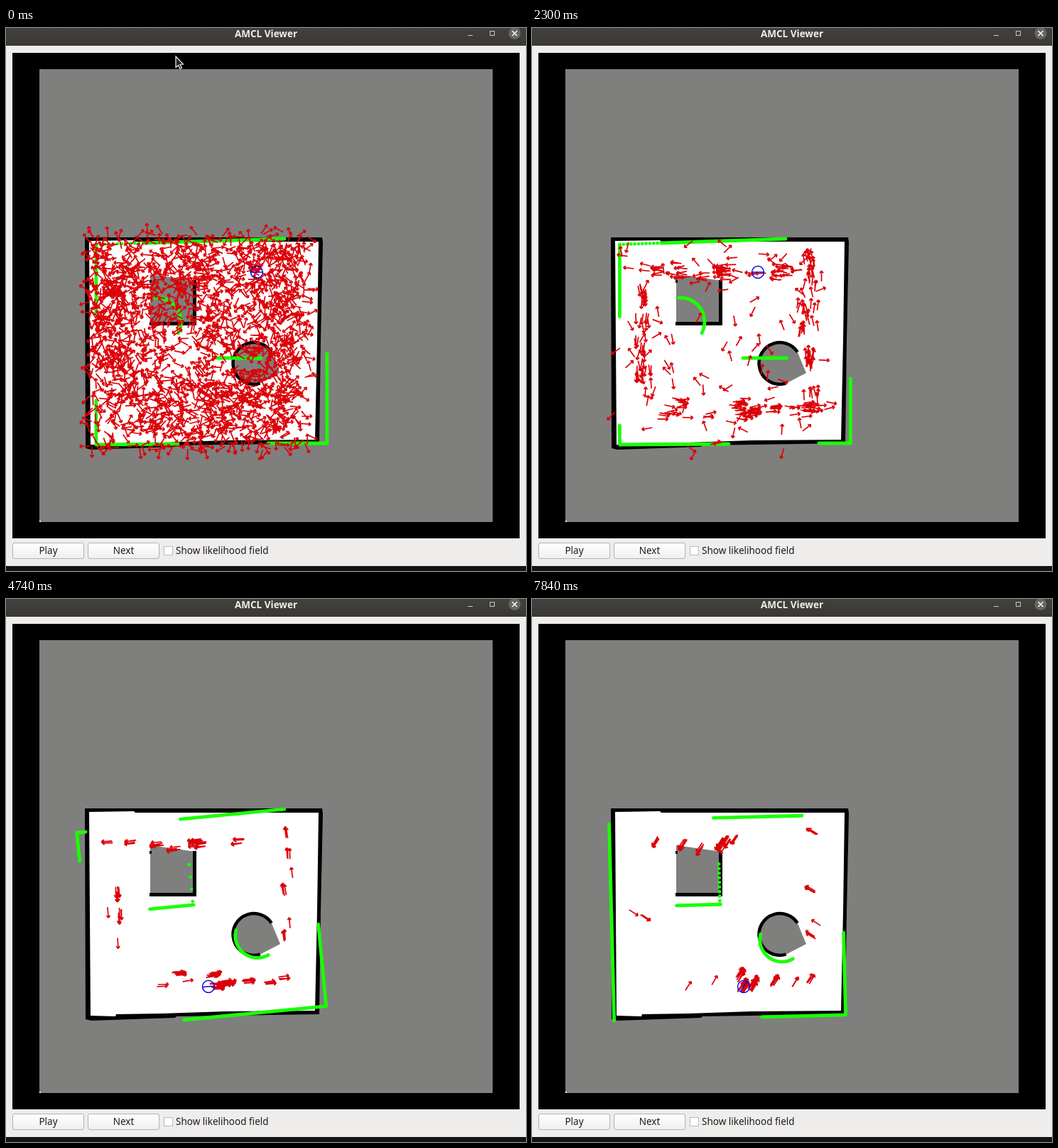
An HTML page with a canvas for the animation above (8 s loop, 732x765 px).

```html
<!DOCTYPE html>
<html lang="en">
<head>
<meta charset="utf-8">
<title>AMCL Viewer</title>
<style>
html, body { margin: 0; width: 100%; height: 100%; overflow: hidden; background: #efedec; }
canvas { display: block; }
</style>
</head>
<body>
<canvas id="view" width="732" height="765"></canvas>
<script>
const ctx = document.getElementById('view').getContext('2d');
const LOOP = 8000;
const RAD = Math.PI / 180;
const RED = '#dc0008', GREEN = '#1aff05', GRAY = '#7f7f7e';

// Times of the filter updates, and when the estimate jumps to the other side
const updates = [0, 40, 640, 1180, 1660, 2300, 2700, 3220, 3700,
                 4240, 4740, 5260, 5760, 6280, 6820, 7380, 7840];
const JUMP = 4240;

// Route around the room: x1, y1, x2, y2, heading
const lanes = [
  [370, 343, 130, 344, 180],
  [156, 365, 157, 512, 90],
  [178, 541, 422, 539, 0],
  [393, 530, 390, 310, 270]
];

// Hypotheses that survive longest: x, y, count, lane
const survivors = [
  [269, 345, 22, 0], [212, 346, 6, 0], [174, 343, 4, 0], [236, 352, 4, 0],
  [159, 449, 2, 1], [143, 442, 1, 1],
  [293, 528, 10, 2], [299, 546, 14, 2], [313, 542, 13, 2], [341, 538, 7, 2],
  [371, 541, 2, 2], [393, 534, 3, 2], [220, 545, 1, 2], [257, 537, 1, 2],
  [393, 328, 3, 3], [391, 409, 4, 3], [391, 473, 3, 3], [400, 456, 1, 3]
];

function rng(seed) {
  return () => {
    seed = seed + 0x6D2B79F5 | 0;
    let v = Math.imul(seed ^ seed >>> 15, 1 | seed);
    v = v + Math.imul(v ^ v >>> 7, 61 | v) ^ v;
    return ((v ^ v >>> 14) >>> 0) / 4294967296;
  };
}

// Estimated pose; the robot drives straight, then turns left
function poseAt(t) {
  if (t < JUMP) return { x: 353 - 0.0152 * t, y: 344, turn: 0 };
  const u = t - 4740;
  return {
    x: 285 + 18 * Math.sin(u / 1330),
    y: 546,
    turn: -5 - 25 * (Math.max(0, u) / 2080) ** 1.83
  };
}

function rect(x, y, w, h, fill) {
  ctx.fillStyle = fill;
  ctx.fillRect(x, y, w, h);
}

function path(pts) {
  ctx.beginPath();
  for (let i = 0; i < pts.length; i += 2) ctx.lineTo(pts[i], pts[i + 1]);
}

function poly(pts, fill) {
  path(pts);
  ctx.closePath();
  ctx.fillStyle = fill;
  ctx.fill();
}

function line(...pts) {
  path(pts);
  ctx.stroke();
}

function arc(x, y, r, from, to, back) {
  ctx.beginPath();
  ctx.arc(x, y, r, from * RAD, to * RAD, back);
}

function dots(x1, y1, x2, y2, n) {
  for (let i = 0; i < n; i++) {
    const k = i / (n - 1);
    arc(x1 + (x2 - x1) * k, y1 + (y2 - y1) * k, 2.4, 0, 360);
    ctx.fill();
  }
}

function label(text, x, y, align, fill = '#1c1c1c', weight = '') {
  ctx.font = weight + ' 13.5px "Noto Sans", "Open Sans", sans-serif';
  ctx.textAlign = align;
  ctx.fillStyle = fill;
  ctx.fillText(text, x, y);
}

function shade(y1, y2, top, bottom) {
  const g = ctx.createLinearGradient(0, y1, 0, y2);
  g.addColorStop(0, top);
  g.addColorStop(1, bottom);
  return g;
}

function button(x, text) {
  ctx.beginPath();
  ctx.roundRect(x + 0.5, 725.5, 100, 22, 2.5);
  ctx.fillStyle = shade(725, 748, '#ffffff', '#f0efee');
  ctx.fill();
  ctx.strokeStyle = '#b4b2b0';
  ctx.lineWidth = 1;
  ctx.stroke();
  label(text, x + 50.5, 741, 'center');
}

function drawWindow() {
  rect(0, 0, 732, 765, '#efedec');
  rect(0, 0, 732, 25, shade(0, 25, '#43413d', '#3a3834'));
  label('AMCL Viewer', 366, 13, 'center', '#f0eee9', 'bold');
  ctx.lineWidth = 1;
  ctx.strokeStyle = '#c9c7c2';
  line(650, 10.5, 657, 10.5);
  ctx.strokeRect(681.5, 4.5, 6, 6);
  arc(716, 7.5, 8.5, 0, 360);
  ctx.fillStyle = '#686661';
  ctx.fill();
  ctx.strokeStyle = '#ffffff';
  ctx.lineWidth = 1.5;
  line(712.5, 4, 719.5, 11);
  line(719.5, 4, 712.5, 11);

  rect(9, 35, 714, 684, '#000');
  rect(47, 58, 638, 638, GRAY);
  rect(47, 694, 2, 2, '#eee');

  button(9, 'Play');
  button(115, 'Next');
  rect(222.5, 730.5, 12, 12, '#fff');
  ctx.strokeStyle = '#bcbab8';
  ctx.lineWidth = 1;
  ctx.strokeRect(222.5, 730.5, 12, 12);
  label('Show likelihood field', 239, 741, 'left');
  rect(0, 758, 732, 7, '#141414');
}

function drawMap() {
  poly([111, 295, 445, 295, 446, 302, 443, 440, 441, 585, 240, 588, 238, 590, 120, 594, 112, 592], '#000');
  poly([117, 300, 180, 299, 182, 301, 440, 301, 438, 440, 435, 580,
        309, 581, 220, 584, 155, 585, 154, 588, 119, 587], '#fff');

  poly([203, 347, 267, 356, 267, 418, 203, 417], GRAY);
  rect(263, 355, 5, 64, '#000');
  rect(202, 414, 66, 5, '#000');
  rect(202, 355, 3, 4, '#000');

  arc(349, 472.5, 29.5, 73, 327);
  ctx.lineTo(386, 486);
  ctx.fillStyle = GRAY;
  ctx.fill();
  arc(349, 472.5, 29.5, 73, 327);
  ctx.strokeStyle = '#000';
  ctx.lineWidth = 4.5;
  ctx.lineCap = 'butt';
  ctx.stroke();
}

// Room as seen while driving along the top; the gaps move with the robot
function scanTop({ x }) {
  const s = (x - 304) / 10, left = 122 + s, right = 447 + s, end = x + 39;
  const mid = left + (end - left) / 4;
  dots(left, 305, mid, 303, 12);
  line(mid, 303, end, 297);
  line(left, 306, left, 408 - s);
  line(left, Math.min(878 - x, 584), left, 587, 595 - x, 586);
  line(right, 812 - x, right, 585, 722 - x, 585);
  line(297, 465, 359, 465);
  arc(left + 85.5, 414, 34, -94, 28);
  ctx.stroke();
}

// The same room from the opposite side, tilted by the heading error
function scanBottom({ x, turn }) {
  const tilt = (-5.5 + Math.max(0, -turn - 30) * 0.15) * RAD;
  const c = Math.cos(tilt), s = Math.sin(tilt), w = 163, h = 141;
  const at = (dx, dy) => [275 + dx * c - dy * s, 449 + dx * s + dy * c];
  const stub = Math.max(0, 16 + turn * 0.7);
  line(...at(-16, -h), ...at(131 - 1.72 * (x - 285), -h));
  line(...at(stub - w, -h + 5), ...at(-w, -h + 5), ...at(-w, Math.min(h, -120 - 4.8 * turn)));
  line(...at(w, 25), ...at(w, h), ...at(-46 - 1.6 * turn, h));
  line(...at(-71, -19), ...at(-9, -19));
  dots(...at(-10, -76), ...at(-10, -24), Math.min(9, Math.round(3 - 0.22 * turn)));
  arc(...at(76, 33), 31, 195, 60, true);
  ctx.stroke();
}

function arrow(x, y, a) {
  const c = Math.cos(a), s = Math.sin(a);
  const hx = x + 7.5 * c, hy = y + 7.5 * s;
  ctx.moveTo(x - 7.5 * c, y - 7.5 * s);
  ctx.lineTo(hx, hy);
  for (const d of [2.5, -2.5]) {
    ctx.moveTo(hx, hy);
    ctx.lineTo(hx + 4.2 * Math.cos(a + d), hy + 4.2 * Math.sin(a + d));
  }
}

function drawParticles(t, turn) {
  const wobble = 30 * Math.exp(-t / 1400);
  const bend = 3 + 60 * Math.exp(-t / 1500);

  function clump(x, y, n, heading, rnd) {
    const off = () => rnd() * 2 - 1;
    const dir = (heading + turn) * RAD, size = n > 1 ? 1.5 * Math.sqrt(n) : 0;
    const c = Math.cos(dir), s = Math.sin(dir);
    for (let i = 0; i < n; i++) {
      const u = off() * size, v = off() * size * 0.8;
      arrow(x + u * c - v * s + off() * wobble, y + u * s + v * c + off() * wobble,
            dir + off() * bend * RAD);
    }
  }

  ctx.beginPath();
  // Strays: uniform over the room, dying out
  let rnd = rng(71);
  const strays = 400 * Math.exp(-((t / 1800) ** 1.6)) + 950 * Math.exp(-t / 100) - 4;
  const ahead = 9 + Math.min(8, t / 100);
  for (let i = 0; i < strays; i++) {
    const x = 117 + rnd() * 307, y = 291 + rnd() * 303, a = rnd() * 2 * Math.PI;
    arrow(x + ahead * Math.cos(a), y + ahead * Math.sin(a), a);
  }
  // Groups moving along the route
  const groups = Math.round(130 * Math.exp(-((t / 2700) ** 1.6)));
  for (let i = 0; i < groups; i++) {
    const own = rng(900 + i);
    const [x1, y1, x2, y2, heading] = lanes[i % 4];
    const k = (own() + 0.014 * t / Math.hypot(x2 - x1, y2 - y1)) % 1;
    const side = (own() + own() - 1) * 16;
    const flat = heading % 180 === 0;
    clump(x1 + (x2 - x1) * k + (flat ? 0 : side), y1 + (y2 - y1) * k + (flat ? side : 0),
          1 + Math.floor(own() ** 2 * 7), heading, own);
  }
  survivors.forEach(([x, y, n, l], i) => clump(x, y, n, lanes[l][4], rng(40 + i)));

  ctx.strokeStyle = RED;
  ctx.lineWidth = 1.7;
  ctx.lineCap = 'butt';
  ctx.lineJoin = 'miter';
  ctx.stroke();
}

function drawPose({ x, y, turn }) {
  const c = 8.5 * Math.cos(turn * RAD), s = 8.5 * Math.sin(turn * RAD);
  ctx.strokeStyle = '#0808d8';
  ctx.lineWidth = 1.5;
  arc(x, y, 8.5, 0, 360);
  ctx.stroke();
  line(x - c, y - s, x + c, y + s);
}

function drawCursor() {
  poly([239, 40, 239, 55.5, 242.5, 52.5, 245, 57.5, 247.5, 56.3, 245, 51.5, 249.5, 51], '#222');
  ctx.strokeStyle = '#f4f4f4';
  ctx.lineWidth = 1.2;
  ctx.stroke();
}

function draw(t) {
  const pose = poseAt(t);
  drawWindow();
  drawMap();
  ctx.strokeStyle = ctx.fillStyle = GREEN;
  ctx.lineWidth = 4.8;
  ctx.lineCap = ctx.lineJoin = 'round';
  if (t < JUMP) scanTop(pose);
  else scanBottom(pose);
  drawParticles(t, pose.turn);
  drawPose(pose);
  if (t < updates[1]) drawCursor();
}

let shown = 0;
function tick(now) {
  const t = updates.filter(u => u <= now % LOOP).pop();
  if (t !== shown) draw(shown = t);
  requestAnimationFrame(tick);
}
draw(shown);
requestAnimationFrame(tick);
</script>
</body>
</html>
```
